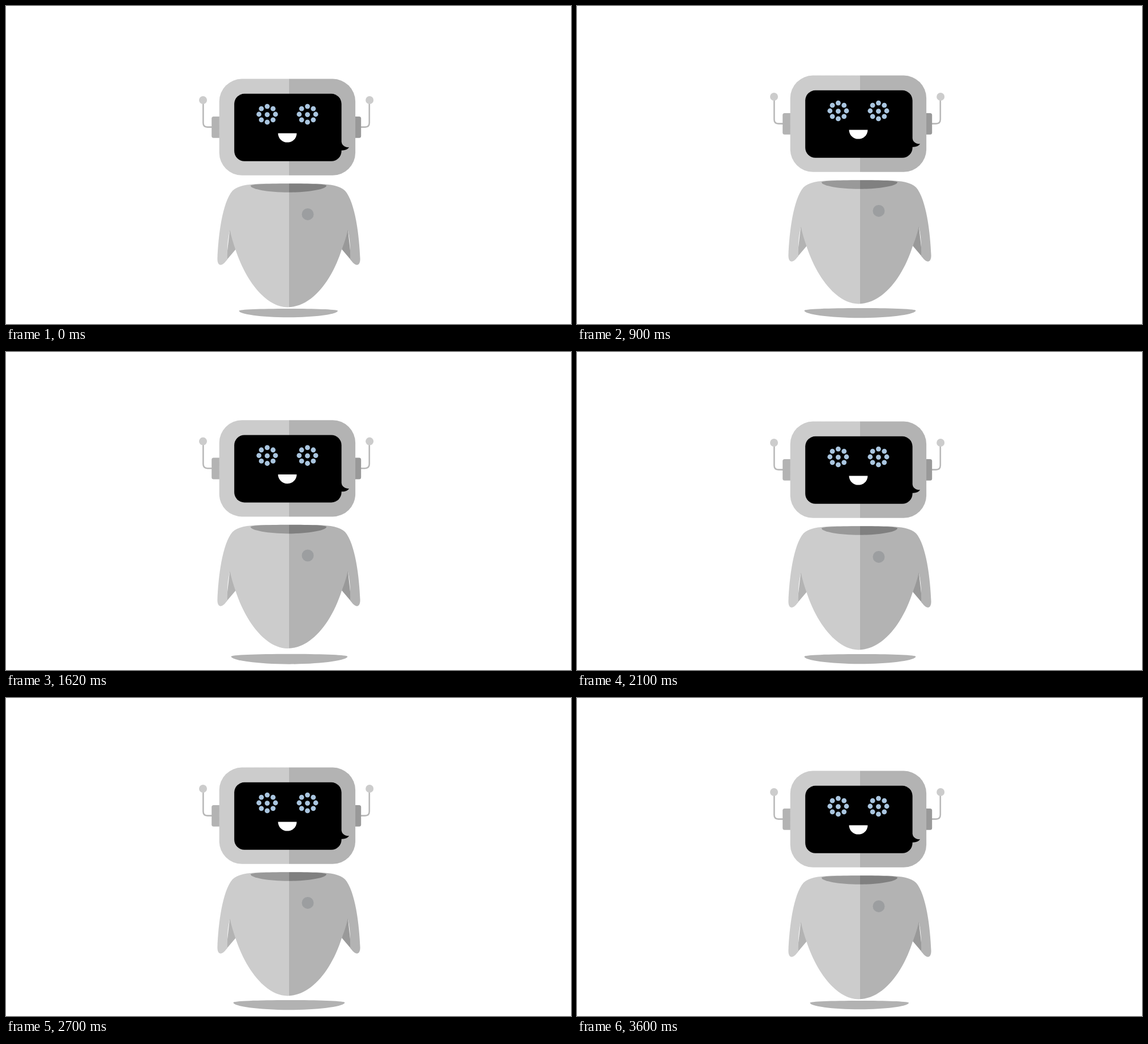
Animation, 998 px wide and 561 px high, one loop 3630 ms. Source, as an HTML page:

```html
<!DOCTYPE html>
<html lang="en">
<head>
<meta charset="utf-8">
<title>Hovering robot</title>
<style>
  html, body { margin: 0; width: 100%; height: 100%; overflow: hidden; background: #fff; }
  svg { display: block; width: 100%; height: 100%; }
</style>
</head>
<body>
<svg viewBox="0 0 998 561">
  <defs>
    <linearGradient id="base" gradientUnits="userSpaceOnUse" x1="0" x2="999.4">
      <stop offset=".5" stop-color="#ccc"/><stop offset=".5" stop-color="#b3b3b3"/>
    </linearGradient>
    <linearGradient id="shade" gradientUnits="userSpaceOnUse" x1="0" x2="999.4">
      <stop offset=".5" stop-color="#b3b3b3"/><stop offset=".5" stop-color="#999"/>
    </linearGradient>
    <linearGradient id="collar" gradientUnits="userSpaceOnUse" x1="0" x2="999.4">
      <stop offset=".5" stop-color="#999"/><stop offset=".5" stop-color="#808080"/>
    </linearGradient>
  </defs>

  <path id="shadow" fill="#b2b2b2" d="M-87.2-3.8C-87.2-6.2-50-7.6 0-7.6S87.2-6.2 87.2-3.8C87.2 2 48 7.7 0 7.7S-87.2 2-87.2-3.8Z"/>

  <g id="robot">
    <!-- antennae and ears -->
    <path fill="none" stroke="#b8b8b8" stroke-width="2.6"
      d="M348.3 166V206Q348.3 213.6 356 213.6H634Q641.8 213.6 641.8 206V166"/>
    <g fill="#ccc"><circle cx="348" cy="166" r="7"/><circle cx="642.2" cy="166" r="7"/></g>
    <rect x="363.2" y="195" width="264" height="37.8" rx="3.5" fill="url(#shade)"/>

    <!-- head -->
    <rect x="376.7" y="128.6" width="240.4" height="170.2" rx="40" fill="url(#base)"/>
    <rect x="403.2" y="154.8" width="189.4" height="119" rx="18"/>
    <path d="M590 240H592.6C593.5 246 599 249.5 606 249.3C603 253.5 598 255.3 590 254.4Z"/>
    <g id="eyes" fill="#a9c5df"></g>
    <path fill="#fff" d="M480.5 224.4H513.5C513.5 233.5 506 240.6 497 240.6S480.5 233.5 480.5 224.4Z"/>

    <!-- arms and torso -->
    <path fill="url(#shade)" d="M395.5 393L389 449L406 429ZM603.7 393L610 449L593 429Z"/>
    <path fill="url(#base)" d="M499.6 313.4H450C425 314.5 409 317 400 326C382 347 375 405 373.4 446
      C373.4 455 377 458.5 382 456C385 454.4 388 451 391 447C390.6 425 391.5 411 395.5 395
      C398 407 401 417 405.2 429C425 490 462 531.4 497 531.4C537 531.4 574 490 593.5 428
      C598 417 601 407 603.7 395C607.5 411 608.4 425 608 447C611 451 614 454.4 617 456
      C622 458.5 625.6 455 625.6 446C624 405 617 347 599 326C590 317 574 314.5 549 313.4Z"/>
    <path fill="url(#collar)" d="M432 317C432 314.5 458 313.2 499 313.2S566 314.5 566 317C566 323 535 328.8 499 328.8S432 323 432 317Z"/>
    <circle cx="533" cy="367.4" r="10.5" fill="#9c9ea0"/>
  </g>
</svg>
<script>
  const LOOP = 3630, STEP = 30, BOB = 1200, LIFT = 12;
  const byId = id => document.getElementById(id);

  const dot = (x, y) => `<circle cx="${x}" cy="${y}" r="4.4"/>`;
  const eye = (cx, cy) => {
    let dots = dot(cx, cy + .6);
    for (let i = 0; i < 8; i++) {
      const a = i * Math.PI / 4;
      dots += dot(cx + 14.6 * Math.cos(a), cy + 13.9 * Math.sin(a));
    }
    return dots;
  };
  byId('eyes').innerHTML = eye(461.4, 191) + eye(532.5, 191);

  const start = performance.now();
  function draw() {
    const t = Math.floor((performance.now() - start) % LOOP / STEP) * STEP;
    // linear rise and fall, 0 at rest and 1 at the top
    const rise = 1 - Math.abs(1 - 2 * (t % BOB) / BOB);
    byId('robot').setAttribute('transform', `translate(0 ${-LIFT * rise})`);
    byId('shadow').setAttribute('transform',
      `translate(${498.8 + 2.3 * rise} 541.6) scale(${1 + .257 * rise})`);
    requestAnimationFrame(draw);
  }
  draw();
</script>
</body>
</html>
```
